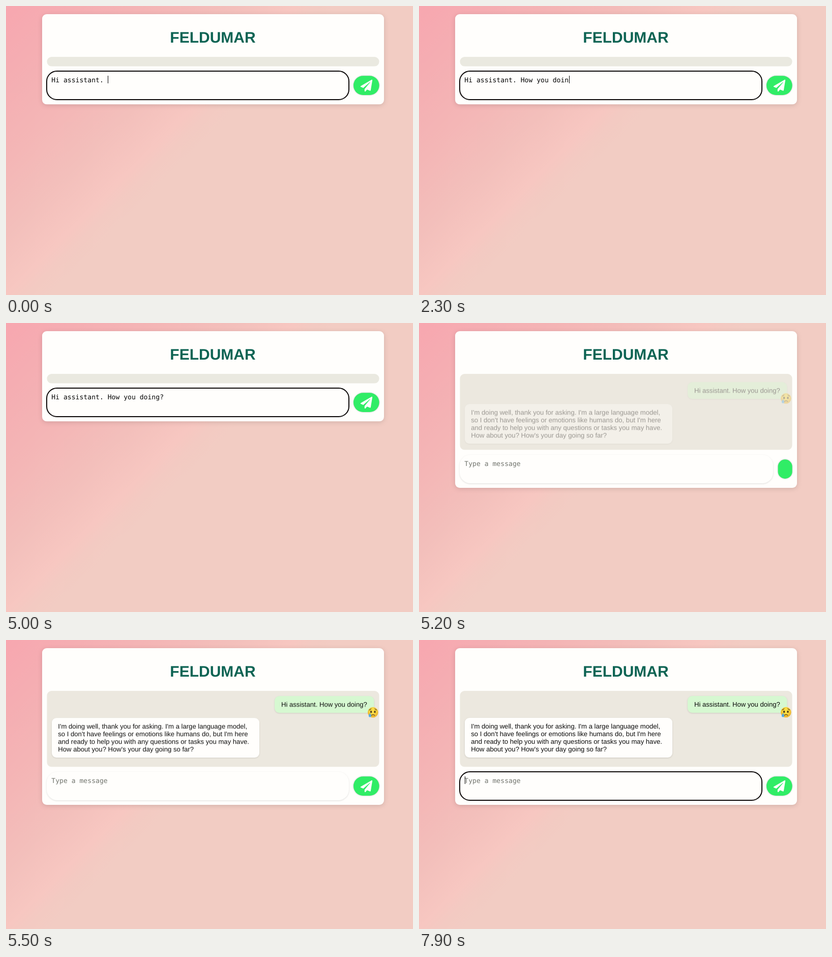
Write an HTML page that moves like this. It is 800 px wide and 568 px high and loops after 8 s.

```html
<!DOCTYPE html>
<html lang="en">
<head>
<meta charset="utf-8">
<title>Chat</title>
<style>
  html, body { margin: 0; width: 100%; height: 100%; overflow: hidden; background: #f2ccc3; }
  svg { display: block; width: 800px; height: 568px; }
  text { white-space: pre; text-rendering: geometricPrecision; }
  .title { font: bold 30px "Liberation Sans", Arial, sans-serif; fill: #0e6454; text-anchor: middle; }
  .mono { font: 13.1px "DejaVu Sans Mono", monospace; }
  .sans { font: 13.1px "Liberation Sans", Arial, sans-serif; fill: #0b0b0b; }
  .card { fill: #fffefc; filter: drop-shadow(0 2px 5px rgba(0, 0, 0, .13)); }
  .soft { filter: drop-shadow(0 1px 1.5px rgba(0, 0, 0, .13)); }
  .button { fill: #30ed66; filter: drop-shadow(0 0 .8px rgba(0, 0, 0, .3)); }
</style>
</head>
<body>
<svg viewBox="0 0 800 568">
  <defs>
    <linearGradient id="sky" gradientUnits="userSpaceOnUse" x1="0" y1="0" x2="400" y2="400">
      <stop offset="0" stop-color="#f8a7b0"/>
      <stop offset=".16" stop-color="#f5adb2"/>
      <stop offset=".38" stop-color="#f4b6b6"/>
      <stop offset=".56" stop-color="#f3bfbb"/>
      <stop offset=".71" stop-color="#f7c7c1"/>
      <stop offset=".76" stop-color="#f3cac2"/>
      <stop offset=".82" stop-color="#f2ccc3"/>
    </linearGradient>
    <radialGradient id="face" cy=".4">
      <stop offset=".5" stop-color="#fbdd42"/>
      <stop offset="1" stop-color="#efb52b"/>
    </radialGradient>
  </defs>
  <rect width="800" height="568" fill="url(#sky)"/>
  <rect id="card" class="card" x="71" y="16" width="672" rx="9"/>
  <text class="title" x="406.5" y="72.3">FELDUMAR</text>
  <rect id="log" x="80.5" y="100" width="653" rx="9"/>

  <g id="messages">
    <rect class="soft" x="528" y="110" width="195.5" height="33" rx="9" fill="#d6f8d1"/>
    <text class="sans" x="541" y="131">Hi assistant. How you doing?</text>
    <rect class="soft" x="90" y="153" width="408" height="78" rx="9" fill="#fffefc"/>
    <g id="reply" class="sans"></g>
    <g transform="translate(721.3 142)">
      <circle r="10.3" fill="url(#face)"/>
      <path d="M-7.2-4.6Q-5-5.2-3.6-7M7.2-4.6Q5-5.2 3.6-7M-3 6.2Q0 2.6 3.4 6.2"
            fill="none" stroke="#5c4420" stroke-width="1.2" stroke-linecap="round"/>
      <ellipse cx="-3.7" cy="-1" rx="1.7" ry="2.3" fill="#4b3a1c"/>
      <ellipse cx="3.7" cy="-1" rx="1.7" ry="2.3" fill="#4b3a1c"/>
      <path d="M-5.6 1.4Q-9 5.6-8.4 7.6A2.7 2.7 0 0 0-3.2 7.4Q-3.4 5-5.6 1.4Z" fill="#4fa9e6"/>
    </g>
  </g>

  <g id="form">
    <rect id="field" class="soft" x="80" y="128" height="56" rx="21" fill="#fffefc"/>
    <rect id="ring" x="80" y="128" width="594" height="56" rx="20" fill="#fffefc" stroke="#0c0808" stroke-width="2"/>
    <text id="entry" class="mono" x="89.3" y="149.5"></text>
    <rect id="caret" y="137" width="1" height="15" fill="#000"/>
    <rect id="button" class="button" y="137.3" height="37.6"/>
    <path id="plane" fill="#fff" transform="translate(696.8 144.8) scale(.0455)"
          d="M476 3L12 271C-6 281-3 306 15 314L121 358L408 105C414 100 422 108 417 114L176 407V488C176 511 204 520 218 503L282 426L407 478C421 484 437 475 440 460L512 28C515 8 493-7 476 3Z"/>
  </g>
</svg>
<script>
const LOOP = 8000, TICK = 100;
const SENT = 5200, READY = 5300, FOCUS = 7800;
const FADE_START = 5085, FADE_TIME = 500, RISE = 9.8;
const TEXT = "Hi assistant. How you doing?";
const TYPED_BEFORE = 14, CHAR_WIDTH = 7.886;
const KEY_TIMES = [300, 500, 700, 900, 1400, 1500, 1600, 1800, 1900, 2000, 2100, 2300, 2400, 2800];
const REPLY = [
  "I'm doing well, thank you for asking. I'm a large language model,",
  "so I don't have feelings or emotions like humans do, but I'm here",
  "and ready to help you with any questions or tasks you may have.",
  "How about you? How's your day going so far?"
];

const el = id => document.getElementById(id);
const set = (id, attrs) => {
  for (const key in attrs) el(id).setAttribute(key, attrs[key]);
};
const show = (id, on) => set(id, { visibility: on ? "visible" : "hidden" });

REPLY.forEach((line, i) => {
  const text = document.createElementNS("http://www.w3.org/2000/svg", "text");
  text.setAttribute("x", 102.3);
  text.setAttribute("y", 174 + 15 * i);
  text.textContent = line;
  el("reply").append(text);
});

// Same curve as the CSS "ease" keyword.
function ease(x) {
  if (x <= 0) return 0;
  if (x >= 1) return 1;
  const curve = (a, b, s) => 3 * a * s * (1 - s) ** 2 + 3 * b * s * s * (1 - s) + s ** 3;
  let low = 0, high = 1;
  for (let i = 0; i < 24; i++) {
    const mid = (low + high) / 2;
    if (curve(.25, .25, mid) < x) low = mid; else high = mid;
  }
  return curve(.1, 1, low);
}

function draw(time) {
  const t = Math.floor(time / TICK) * TICK;
  const sent = t >= SENT;
  const waiting = sent && t < READY;
  const focused = !sent || t >= FOCUS;
  const typed = sent ? 0 : TYPED_BEFORE + KEY_TIMES.filter(k => k <= t).length;
  const caretOn = t < 3500 || (t >= 4100 && t < 4600) || t >= FOCUS;

  set("card", { height: sent ? 308 : 177.3 });
  set("log", { height: sent ? 149.3 : 18.6, fill: sent ? "#ece8df" : "#eae9e0" });
  set("form", { transform: `translate(0 ${sent ? 131 : 0})` });

  const p = ease((t - FADE_START) / FADE_TIME);
  show("messages", sent);
  set("messages", { opacity: p, transform: `translate(0 ${RISE * (1 - p)})` });

  set("field", { width: waiting ? 616 : 594 });
  show("ring", focused);
  el("entry").textContent = sent ? "Type a message" : TEXT.slice(0, typed);
  set("entry", { fill: sent ? "#73766f" : "#080808" });
  show("caret", caretOn);
  set("caret", { x: Math.round(89.6 + typed * CHAR_WIDTH) });

  const width = waiting ? 28 : 50.6;
  set("button", { x: 733.6 - width, width, rx: Math.min(width / 2, 18.8) });
  show("plane", !waiting);
}

const start = performance.now();
function loop() {
  draw((performance.now() - start) % LOOP);
  requestAnimationFrame(loop);
}
loop();
</script>
</body>
</html>
```
